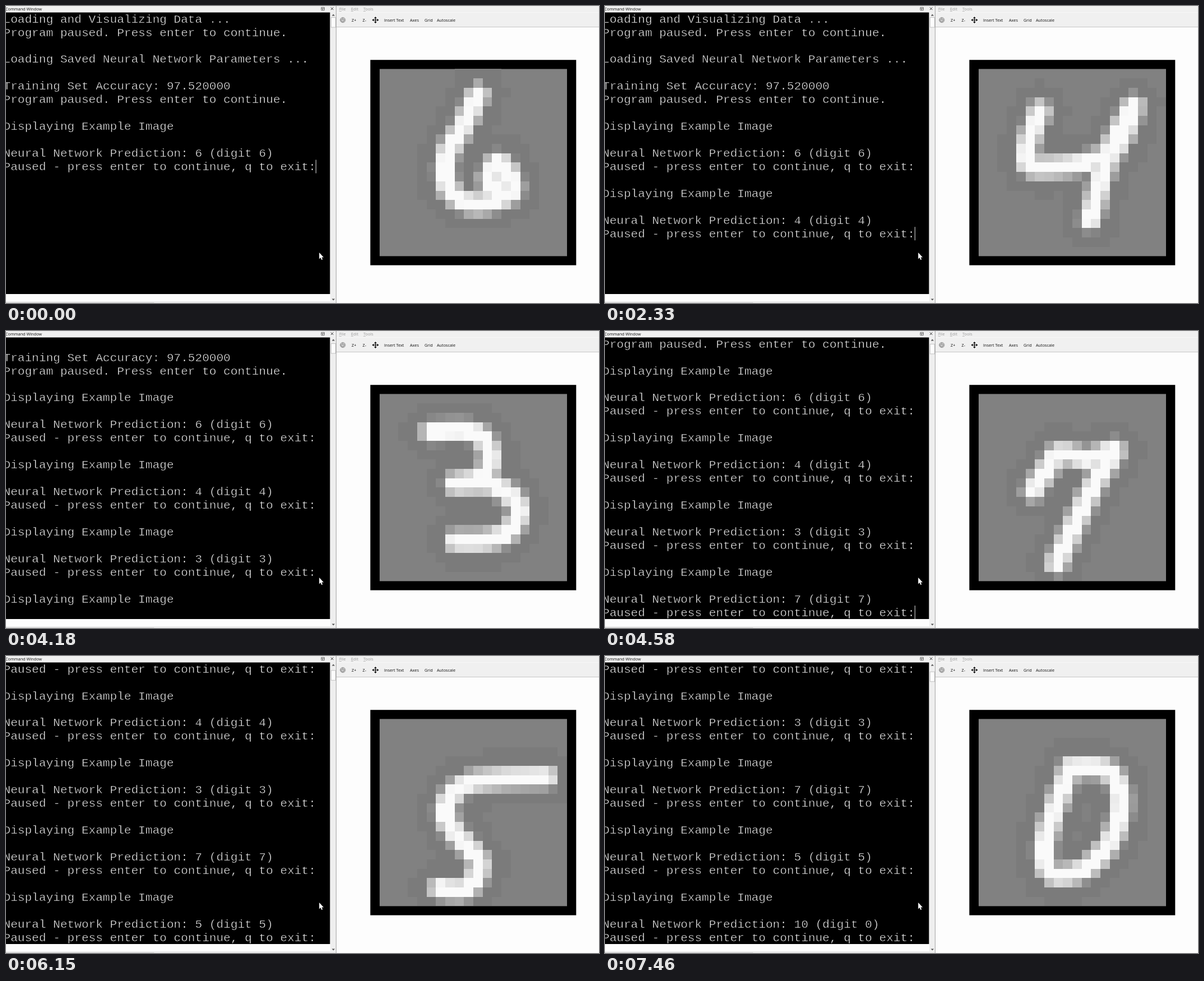
These frames come from a looping animation (1057 by 530 pixels, 8 s). An HTML page:

```html
<!DOCTYPE html>
<html lang="en">
<head>
<meta charset="utf-8">
<title>Digit prediction</title>
<style>
html, body { margin: 0; width: 100%; height: 100%; overflow: hidden; background: #fdfdfd; }
svg { display: block; }
.ui { font: 7.3px "Open Sans", "Noto Sans", sans-serif; fill: #111; }
.dim { fill: #999; }
.term {
  font: 21.08px "Liberation Mono", "Courier New", monospace;
  fill: #eee; stroke: #000; stroke-width: .5px; white-space: pre;
}
</style>
</head>
<body>
<svg width="1057" height="530" viewBox="0 0 1057 530">
  <rect width="1057" height="530" fill="#fdfdfd"/>

  <!-- figure window -->
  <rect x="589" width="468" height="38" fill="#f0f0f0"/>
  <path d="M589 11.5H1057" stroke="#f7f7f7"/>
  <path d="M589 37.5H1057" stroke="#c4c4c4"/>
  <g class="ui">
    <g class="dim">
      <text x="594" y="8">File</text><text x="615" y="8">Edit</text><text x="637" y="8">Tools</text>
      <path d="M594 9.5h4M615 9.5h4M637 9.5h4" stroke="#aaa" stroke-width=".7"/>
    </g>
    <text x="616" y="27.7">Z+</text><text x="635.5" y="27.7">Z-</text>
    <text x="674" y="27.7">Insert Text</text><text x="720" y="27.7">Axes</text>
    <text x="746" y="27.7">Grid</text><text x="768" y="27.7">Autoscale</text>
  </g>
  <g fill="none" stroke="#9a9a9a">
    <circle cx="600.3" cy="25" r="4.6" fill="#c9c9c9"/>
    <path d="M598 23a3 3 0 1 0 4 0M600 20.5v4.5" stroke="#858585"/>
  </g>
  <path d="M658.5 21v8M654.5 25h8" stroke="#000" stroke-width="1.2"/>
  <path d="M658.5 19l2.3 3h-4.6zM658.5 31l2.3-3h-4.6zM652.500 25l3-2.3v4.6zM664.5 25l-3-2.3v4.6z"/>
  <rect x="649.4" y="96.2" width="366.9" height="366.4"/>
  <rect x="666" y="112.4" width="334" height="334" fill="#818181"/>
  <g id="digits" shape-rendering="crispEdges"></g>

  <!-- command window -->
  <rect width="588" height="12" fill="#f0f0f0"/>
  <text class="ui" x="-1" y="8">Command Window</text>
  <path d="M562 2.5h5.5v5h-5.5zM562 4.5h5.5M564.5 4.5v3" fill="none" stroke="#555" stroke-width=".8"/>
  <path d="M579 2.5l4.5 4.5M583.5 2.5l-4.5 4.5" stroke="#333"/>
  <rect y="11.5" width="577.5" height="502.5"/>
  <path d="M0 528.5H588" stroke="#ececec" stroke-width="3"/>
  <path d="M0 529.5H264" stroke="#cfcfcf"/>
  <rect x="578" y="12" width="10" height="516" fill="#efefef"/>
  <rect id="thumb" x="579.5" width="8" height="17.5" fill="#fdfdfd" stroke="#c2c2c2"/>
  <path d="M580.8 17.5l2.7-3 2.7 3zM580.8 522.5l2.7 3 2.7-3z" fill="#555"/>
  <path d="M588.5 0V530" stroke="#a4a4a4"/>
  <g id="rows" class="term"></g>
  <rect id="caret" x="552" width="1" height="24" fill="#ddd"/>
  <path d="M558.3 440v11.5l2.5-2.4 1.7 4 1.9-.8-1.7-3.9h3.5z" fill="#fff"/>
</svg>
<script>
const LOOP = 8000, BLINK = 470;
const ROWS = 21, PITCH = 23.95, TOP = 11;
const GRID = 20, CELL = 16.7, PEN = 1.05, HALO = 2;

// Each round: the predicted label, when it appears, when the caret first hides,
// when enter is pressed, and the key points of the pen curve on the grid.
const rounds = [
  { label: 6, at: 0, blink: 310, enter: 1330,
    pen: "10,2.2 8.4,5.6 6.6,9 7,12.4 9.7,13.9 13.4,12.8 13.3,10.8 12.1,9.5 11.2,11.3 12,12" },
  { label: 4, at: 1620, blink: 1800, enter: 2790,
    pen: "6,4 4.6,8.5 6,10 13.4,8.6 16,3.4 13.4,8.6 11.4,15.6" },
  { label: 3, at: 3170, blink: 3340, enter: 4180,
    pen: "5,3.5 9.6,3.6 11.3,6 10.4,8.4 7.5,9.1 11.6,9.2 14.3,11.5 13.4,14 11,15.1 7.6,15.2" },
  { label: 7, at: 4580, blink: 4730, enter: 5590,
    pen: "5.3,9.8 7,7.2 8.2,5.8 11.2,6.4 14,5.5 12.5,8 10.9,11 7.8,17.6" },
  { label: 5, at: 6060, blink: 6150, enter: 6990,
    pen: "17.3,5.7 12,5.9 8.4,6.6 6.5,9 7.3,11.3 10.1,14.8 8.7,17.6 5.9,17.6" },
  { label: 10, at: 7310, blink: 7460, enter: LOOP,
    pen: "9.3,4.7 13,4.9 14.6,7.3 14.1,11.4 11.3,15.2 7.5,16.1 6.5,13.4 7.5,9.5 9.3,4.7" }
];

const lines = [
  "Loading and Visualizing Data ...", "Program paused. Press enter to continue.", "",
  "Loading Saved Neural Network Parameters ...", "",
  "Training Set Accuracy: 97.520000", "Program paused. Press enter to continue.", "",
  ...rounds.flatMap(({ label }) => [
    "Displaying Example Image", "",
    `Neural Network Prediction: ${label} (digit ${label % 10})`,
    "Paused - press enter to continue, q to exit:", ""
  ])
];

const byId = id => document.getElementById(id);
const clamp = (v, lo, hi) => Math.min(hi, Math.max(lo, v));

function add(parent, tag, attrs = {}) {
  const node = document.createElementNS("http://www.w3.org/2000/svg", tag);
  for (const key in attrs) node.setAttribute(key, attrs[key]);
  return parent.appendChild(node);
}

// Catmull-Rom curve through the key points, as closely spaced samples.
function sampleCurve(pen, perSpan = 24) {
  const keys = pen.split(" ").map(pair => pair.split(",").map(Number));
  const key = i => keys[clamp(i, 0, keys.length - 1)];
  const samples = [];
  for (let n = 0; n <= (keys.length - 1) * perSpan; n++) {
    const i = Math.floor(n / perSpan), t = n / perSpan - i;
    samples.push([0, 1].map(axis => {
      const [a, b, c, d] = [-1, 0, 1, 2].map(k => key(i + k)[axis]);
      return b + t * (c - a + t * (2 * a - 5 * b + 4 * c - d + t * (3 * (b - c) + d - a))) / 2;
    }));
  }
  return samples;
}

// Shades every cell by its distance from the pen; a faint halo rings the ink.
function drawDigit({ pen }) {
  const group = add(byId("digits"), "g"), curve = sampleCurve(pen);
  for (let row = 0; row < GRID; row++) for (let col = 0; col < GRID; col++) {
    const distance = Math.min(...curve.map(([x, y]) => Math.hypot(x - col, y - row)));
    if (distance > PEN + HALO) continue;
    const ink = clamp(PEN + .5 - distance, 0, 1);
    const shade = ink ? Math.round(129 + 121 * ink) : 123;
    add(group, "rect", {
      x: 666 + col * CELL, y: 112.4 + row * CELL, width: CELL, height: CELL,
      fill: `rgb(${shade},${shade},${shade})`
    });
  }
  return group;
}

const digits = rounds.map(drawDigit);
const rows = Array.from({ length: ROWS }, (_, i) =>
  add(byId("rows"), "text", { x: -4.5, y: TOP + 18.6 + i * PITCH }));
const caret = byId("caret"), thumb = byId("thumb");

function show(time) {
  const index = rounds.findLastIndex(round => round.at <= time);
  const { blink, enter } = rounds[index];
  const entered = time >= enter;
  const caretOn = !entered && (time < blink || Math.floor((time - blink) / BLINK) % 2 === 1);
  const count = 12 + 5 * index + (entered ? 3 : 0);
  const scroll = Math.max(0, count - ROWS);
  rows.forEach((row, i) => row.textContent = i + scroll < count ? lines[i + scroll] : "");
  digits.forEach((digit, i) => digit.style.display = i === index ? "" : "none");
  caret.setAttribute("y", TOP + (count - 1 - scroll) * PITCH);
  caret.style.display = caretOn ? "" : "none";
  thumb.setAttribute("y", 20.5 + scroll * .48);
}

const start = performance.now();
function tick() {
  show((performance.now() - start) % LOOP);
  requestAnimationFrame(tick);
}
tick();
</script>
</body>
</html>
```
